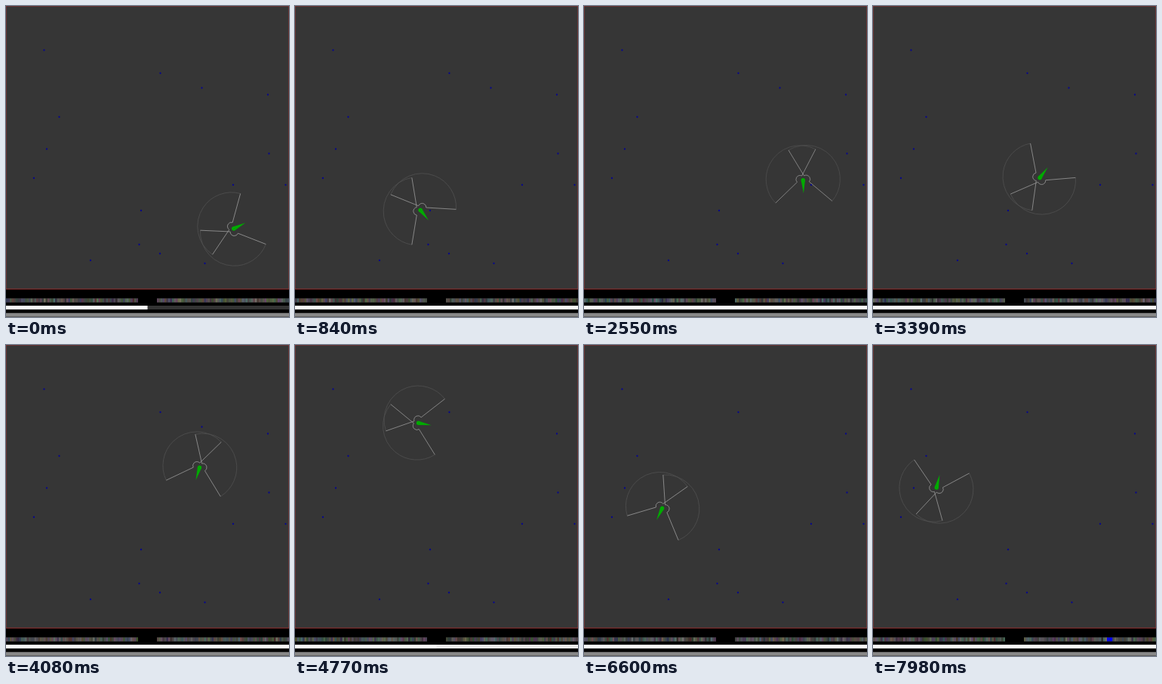
Write an HTML page with a canvas that moves like this. It is 375 px wide and 412 px high and loops after 8000 ms.

```html
<!DOCTYPE html>
<html lang="en">
<head>
<meta charset="utf-8">
<title>Foraging agent</title>
<style>
  html, body { margin: 0; width: 100%; height: 100%; overflow: hidden; background: #000; }
  canvas { display: block; }
</style>
</head>
<body>
<canvas id="stage" width="375" height="412"></canvas>
<script>
const ctx = document.getElementById('stage').getContext('2d');
const LOOP = 8000, STEP = 30, RAD = Math.PI / 180;
const SPEED = 0.25;          // px per ms, sets how far the agent swings out between poses
const EATEN = 2, EAT_TIME = 4290, RECOVERY = 515;

const food = [
  [50.5, 58.5], [204.5, 89], [259.5, 108.5], [347, 117.5], [70.5, 147], [54, 189.5], [348.5, 195.5],
  [37, 228], [301, 237], [370.5, 237], [179, 271], [176.5, 316], [204, 328], [112, 337], [263.5, 341]
];

// Key poses: time, x, y, direction of travel in degrees.
const poses = [
  [0, 301.7, 295, 153.3],
  [1710, 210.7, 256.6, 35.5],
  [3390, 221, 227.7, 127.2],
  [EAT_TIME, ...food[EATEN], -105],
  [4770, 163.5, 103.3, 190.1],
  [5760, 88, 195, -23.3],
  [6600, 103.6, 216.3, -64.5],
  [7980, 84.2, 189, 103.8]
];

const eye = { x: 1.25, y: 4.07, inner: 5.3, outer: 45, from: -29.3 * RAD, to: 132 * RAD, cells: 70 };

// Position and slope of a cubic from p to q with end slopes m and n.
function hermite(s, p, q, m, n) {
  const c = 3 * (q - p) - 2 * m - n, d = 2 * (p - q) + m + n;
  return [p + s * (m + s * (c + s * d)), m + s * (2 * c + 3 * s * d)];
}

function poseAt(t) {
  const next = Math.max(1, poses.findIndex(pose => pose[0] > t));
  const i = t >= poses.at(-1)[0] ? poses.length - 1 : next;
  const [t0, x0, y0, a0] = poses[i - 1], [t1, x1, y1, a1] = poses[i];
  const s = Math.min(1, (t - t0) / (t1 - t0)), pull = SPEED * (t1 - t0);
  const [x, dx] = hermite(s, x0, x1, pull * Math.cos(a0 * RAD), pull * Math.cos(a1 * RAD));
  const [y, dy] = hermite(s, y0, y1, pull * Math.sin(a0 * RAD), pull * Math.sin(a1 * RAD));
  return { x, y, angle: Math.atan2(dy, dx) };
}

function randomFrom(seed) {
  return () => {
    seed = (Math.imul(seed, 1664525) + 1013904223) >>> 0;
    return seed / 4294967296;
  };
}

function rect(color, x, y, w, h) {
  ctx.fillStyle = color;
  ctx.fillRect(x, y, w, h);
}

function disc(color, x, y, r) {
  ctx.fillStyle = color;
  ctx.beginPath();
  ctx.arc(x, y, r, 0, 2 * Math.PI);
  ctx.fill();
}

function strokeArc(color, r) {
  ctx.strokeStyle = color;
  ctx.beginPath();
  ctx.arc(0, 0, r, eye.from, eye.to);
  ctx.stroke();
}

function drawEye(side) {
  ctx.save();
  ctx.scale(1, side);
  ctx.translate(eye.x, eye.y);
  strokeArc('#505050', eye.outer);
  strokeArc('#989898', eye.inner);
  ctx.beginPath();
  for (const a of [eye.from, eye.to]) {
    ctx.moveTo(eye.inner * Math.cos(a), eye.inner * Math.sin(a));
    ctx.lineTo(eye.outer * Math.cos(a), eye.outer * Math.sin(a));
  }
  ctx.stroke();
  ctx.restore();
}

function drawAgent(pose) {
  ctx.save();
  ctx.translate(pose.x, pose.y);
  ctx.rotate(pose.angle);
  ctx.lineWidth = 0.75;
  drawEye(-1);
  drawEye(1);
  disc('#00aa00', 0, 0, 2.7);
  ctx.beginPath();
  ctx.moveTo(0, -2.7);
  ctx.lineTo(-17.5, 0);
  ctx.lineTo(0, 2.7);
  ctx.fill();
  ctx.restore();
}

// One strip of cells per eye; food in view lights its cells blue.
function drawRetina(side, pose, items, random) {
  const left = side < 0 ? 0 : 200, width = 175 / eye.cells;
  const cos = Math.cos(pose.angle), sin = Math.sin(pose.angle);
  const scale = eye.cells / (eye.to - eye.from), seen = new Set();
  for (const [fx, fy] of items) {
    const dx = fx - pose.x, dy = fy - pose.y;
    const x = dx * cos + dy * sin - eye.x;
    const y = side * (dy * cos - dx * sin) - eye.y;
    const distance = Math.hypot(x, y);
    if (distance > eye.outer) continue;
    const half = Math.atan2(1.5, distance) * scale;
    const middle = (Math.atan2(y, x) - eye.from) * scale;
    for (let c = Math.round(middle - half); c < middle + half - 0.5; c++) seen.add(c);
  }
  rect('#484848', left, 387.5, 175, 5);
  for (let c = 0; c < eye.cells; c++) {
    const base = 60 + 35 * random();
    const tone = () => Math.round(base + 44 * (random() - 0.5));
    const color = seen.has(c) ? '#0000f0' : `rgb(${tone()},${tone()},${tone()})`;
    rect(color, left + (side < 0 ? eye.cells - 1 - c : c) * width, 387.5, width, 5);
  }
}

function draw(t) {
  const pose = poseAt(t), random = randomFrom(t * 977 + 5);
  const items = food.filter((_, i) => i !== EATEN || t < EAT_TIME);
  rect('#000', 0, 0, 375, 412);
  rect('#363636', 0, 0, 375, 375);
  ctx.strokeStyle = '#993333';
  ctx.lineWidth = 1;
  ctx.strokeRect(0, 0, 375, 375);
  items.forEach(([x, y]) => disc('#08088c', x, y, 1.15));
  drawAgent(pose);

  drawRetina(-1, pose, items, random);
  drawRetina(1, pose, items, random);

  const age = t < EAT_TIME ? t + 105 : t - EAT_TIME;
  const level = Math.round(255 * Math.min(1, age / RECOVERY));
  rect(`rgb(${level},${level},${level})`, 0, 397, 375, 5);
  rect('#fff', 0, 397, 187.5, 5);
  rect('#888', 0, 406.7, 375, 5);
}

const start = performance.now();
function tick() {
  const t = (performance.now() - start) % LOOP;
  draw(Math.floor(t / STEP) * STEP);
  requestAnimationFrame(tick);
}
tick();
</script>
</body>
</html>
```
